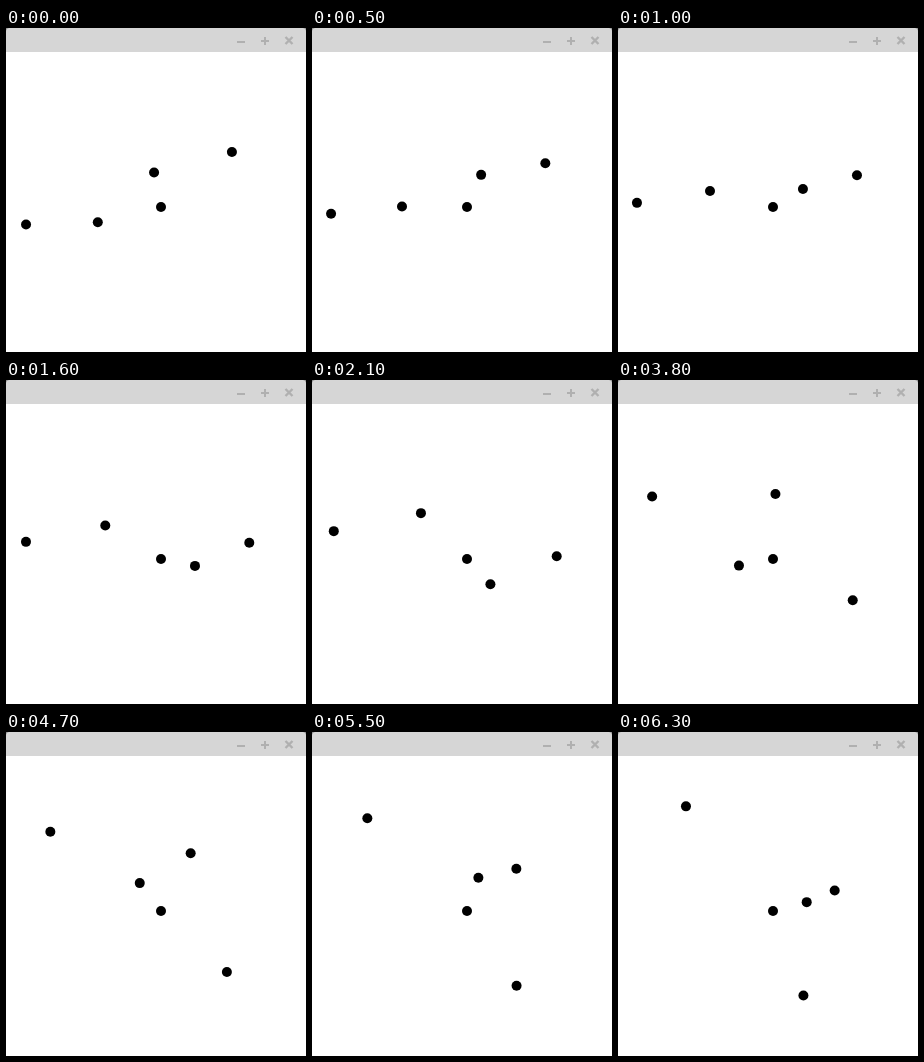
Write an HTML page that moves like this. It is 300 px wide and 324 px high and loops after 6400 ms.

```html
<!DOCTYPE html>
<html lang="en">
<head>
<meta charset="utf-8">
<title>Orbits</title>
<style>
  html, body { margin: 0; width: 100%; height: 100%; overflow: hidden; background: #fff; }
  svg { display: block; }
</style>
</head>
<body>
<svg width="300" height="324" viewBox="0 0 300 324">
  <path d="M0 0h4v4h-4zM296 0h4v4h-4z" fill="#8c8c8c"/>
  <path d="M0 24V3.5Q0 0 3.5 0H296.5Q300 0 300 3.5V24Z" fill="#d6d6d6"/>
  <g fill="none" stroke="#b0b0b0" stroke-width="2">
    <path d="M231 14h8M255 13h8M259 9v8"/>
    <path d="M279.5 9l7 7M286.5 9l-7 7" stroke-width="2.4"/>
  </g>
  <g id="bodies"><circle cx="155" cy="179" r="5"/></g>
</svg>
<script>
const LOOP = 6400, STEP = 100;
const group = document.getElementById('bodies');

// Circular orbits; start in degrees, speed in degrees per second
const planets = [
  { cy: 178.6, radius: 34.75, start: -101.5, speed: 71.02 },
  { cy: 179, radius: 65, start: 166.5, speed: 27.8 },
  { cy: 179, radius: 89.75, start: -37.8, speed: 17.14 },
  { cy: 179, radius: 136.1, start: 172.6, speed: 9.15 }
];

for (const planet of planets) {
  planet.dot = group.appendChild(group.firstElementChild.cloneNode());
}

function draw() {
  const seconds = Math.floor(performance.now() % LOOP / STEP) * STEP / 1000;
  for (const { dot, cy, radius, start, speed } of planets) {
    const angle = (start + speed * seconds) * Math.PI / 180;
    dot.setAttribute('cx', 155 + radius * Math.cos(angle));
    dot.setAttribute('cy', cy + radius * Math.sin(angle));
  }
  requestAnimationFrame(draw);
}
draw();
</script>
</body>
</html>
```
